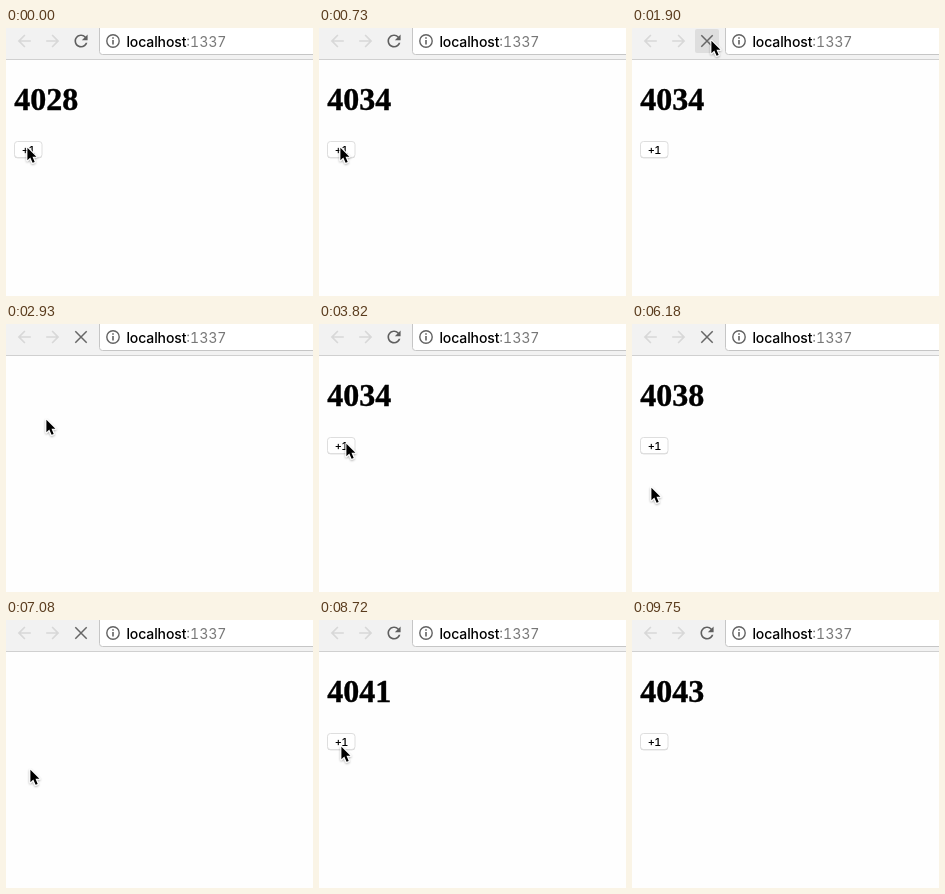
These frames come from a looping animation (307x268 px, 9.9 s). An HTML page:

```html
<!DOCTYPE html>
<html lang="en">
<head>
<meta charset="utf-8">
<title>Counter</title>
<style>
  html, body { margin: 0; width: 100%; height: 100%; overflow: hidden; background: #fefefe; }
  svg { display: block; }
  .ui { font-family: Inter, Roboto, sans-serif; font-feature-settings: "tnum"; }
  .title { font: bold 32px "Liberation Serif", "Times New Roman", serif; stroke: #000; stroke-width: .4; }
  .icon { fill: #5f5f5f; }
  .off { fill: #d8d8d8; }
</style>
</head>
<body>
<svg width="307" height="268" viewBox="0 0 307 268">
  <defs>
    <path id="arrow" d="M8-1H-4.17L1.42-6.59 0-8-8 0 0 8 1.41 6.59-4.17 1H8z"/>
    <filter id="soft" x="-50%" y="-50%" width="200%" height="200%">
      <feDropShadow dx="0" dy="1" stdDeviation=".8" flood-opacity=".35"/>
    </filter>
  </defs>

  <rect width="307" height="268" fill="#fefefe"/>
  <rect width="307" height="31" fill="#f2f2f2"/>
  <rect y="31" width="307" height="1" fill="#d0d0d0"/>
  <use href="#arrow" class="off" transform="translate(18.3 13) scale(.82)"/>
  <use href="#arrow" class="off" transform="translate(46.7 13) scale(-.82 .82)"/>

  <rect id="hover" x="63" y="1" width="24" height="24" rx="2" fill="#dedede"/>
  <path id="reload" class="icon" transform="translate(65.2 3.2) scale(.82)" d="M17.65 6.35C16.2 4.9 14.21 4 12 4c-4.42 0-7.99 3.58-7.99 8s3.57 8 7.99 8c3.73 0 6.84-2.55 7.73-6h-2.08c-.82 2.33-3.04 4-5.65 4-3.31 0-6-2.69-6-6s2.69-6 6-6c1.66 0 3.14.69 4.22 1.78L13 11h7V4z"/>
  <path id="stop" d="M69.3 7.3l11.4 11.4m0-11.4l-11.4 11.4" stroke="#666" stroke-width="1.5"/>

  <rect x="93.5" y="-3.5" width="230" height="30" rx="3" fill="#fff" stroke="#c6c6c6"/>
  <circle cx="107" cy="13" r="6.2" fill="none" stroke="#626262" stroke-width="1.4"/>
  <path d="M107 9.3v1.5m0 1.2v4.6" stroke="#626262" stroke-width="1.6"/>
  <text class="ui" x="120.4" y="18.5" font-size="14"><tspan font-weight="500" letter-spacing="-.1">localhost</tspan><tspan fill="#777">:1337</tspan></text>

  <g id="page">
    <text id="count" class="title" x="8.3" y="82">4028</text>
    <rect x="8.5" y="114" width="27.5" height="16.2" rx="3" fill="#c8c8c8"/>
    <rect x="8.5" y="113.5" width="27.5" height="16" rx="3" fill="#fff" stroke="#dedede"/>
    <text class="ui" x="22.3" y="126" font-size="11" font-weight="500" letter-spacing="-.5" text-anchor="middle">+1</text>
  </g>

  <g id="cursor">
    <path d="M.4.8V13.3L3.3 10.6 5.6 15.8 7.7 14.9 5.5 9.8H9.4z" stroke="#fff" stroke-width="2"
      stroke-linejoin="round" paint-order="stroke" filter="url(#soft)"/>
  </g>
</svg>
<script>
  // All times count steps of the screen, which refreshes 67 times per loop
  const LOOP = 9900, STEPS = 67;

  // Resting and turning points of the cursor: step, x, y
  const stops = [
    [0, 21, 119], [6, 21, 119], [11, 79, 12], [16, 79, 12], [22, 27, 124], [26, 27, 119],
    [32, 27, 119], [36, 77, 43], [38, 81, 12], [43, 12, 181], [48, 24, 149],
    [53, 21, 130], [55, 22, 126], [60, 22, 126], [62, 196, 210], [66, 270, 272]
  ];
  // Clicks on the button: first step, count, gap
  const bursts = [[1, 6, .8], [30, 4, 1], [57, 5, 1]];
  const reloads = [13, 39];

  const el = id => document.getElementById(id);
  const show = (id, on) => el(id).setAttribute("visibility", on ? "visible" : "hidden");
  const ease = u => u * u * (3 - 2 * u);

  function cursorAt(step) {
    const next = stops.findIndex(s => s[0] > step);
    if (next < 0) return stops.at(-1).slice(1);
    const [t0, x0, y0] = stops[next - 1], [t1, x1, y1] = stops[next];
    const k = ease((step - t0) / (t1 - t0));
    return [x0 + (x1 - x0) * k, y0 + (y1 - y0) * k].map(Math.round);
  }

  function clicksBy(step) {
    return bursts.reduce((sum, [first, count, gap]) =>
      sum + Math.max(0, Math.min(count, Math.floor((step - first) / gap + 1e-6) + 1)), 0);
  }

  function draw(step) {
    const [x, y] = cursorAt(step);
    const loadingFor = (from, to) => reloads.some(r => step >= r + from && step < r + to);
    el("cursor").setAttribute("transform", `translate(${x} ${y})`);
    el("count").textContent = 4028 + clicksBy(step);
    show("hover", x >= 63 && x < 87 && y < 25);
    show("stop", loadingFor(0, 12));
    show("reload", !loadingFor(0, 12));
    show("page", !loadingFor(7, 11));
  }

  const start = performance.now();
  function tick() {
    const t = (performance.now() - start) % LOOP;
    draw(Math.min(STEPS - 1, Math.floor(t / LOOP * STEPS + .2)));
    requestAnimationFrame(tick);
  }
  tick();
</script>
</body>
</html>
```
